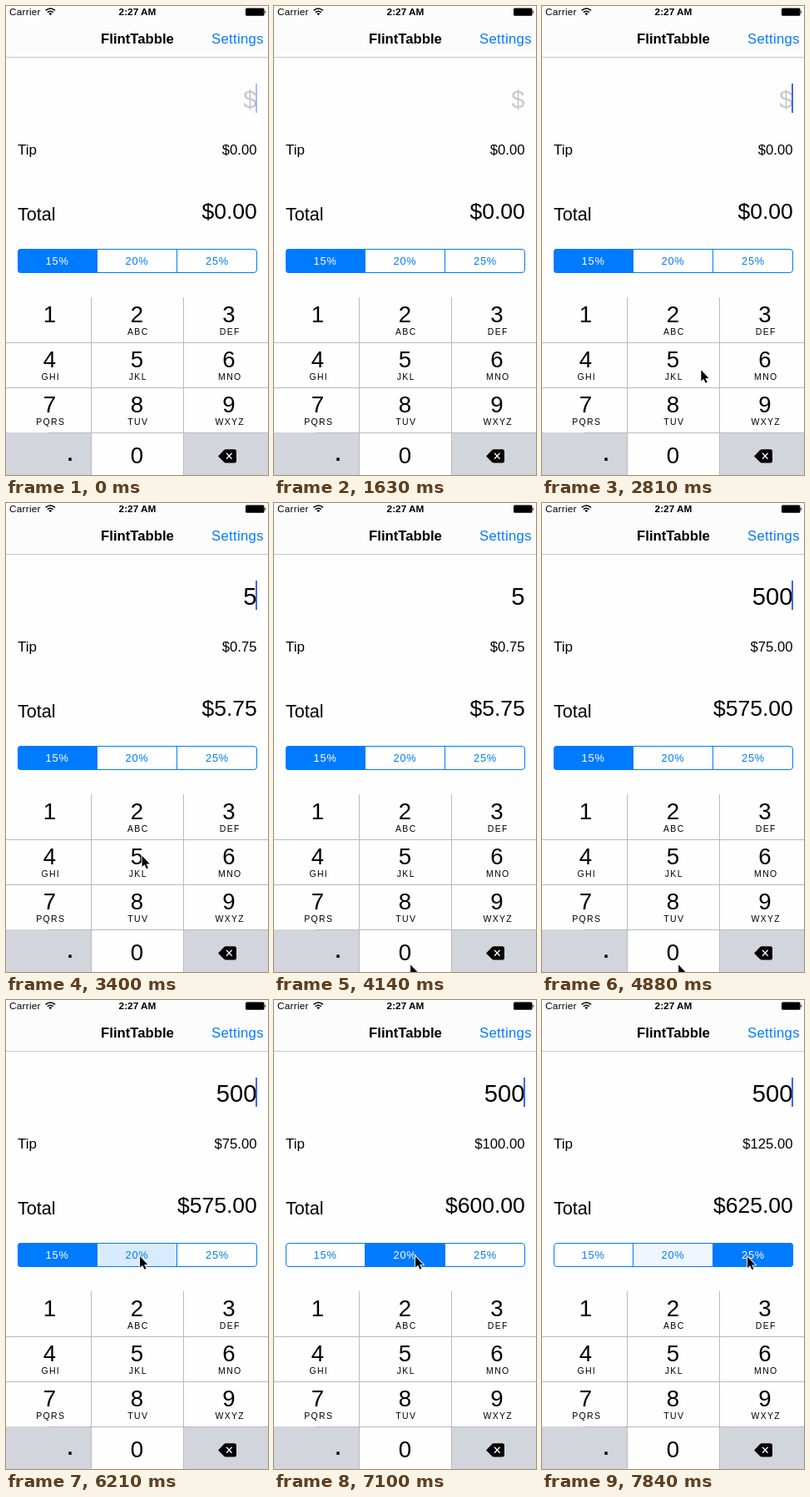
An HTML page that plays this animation: 315x562 px, repeating every 7.99 s.

```html
<!DOCTYPE html>
<html lang="en">
<head>
<meta charset="utf-8">
<title>Tip calculator</title>
<style>
  html, body { margin: 0; width: 100%; height: 100%; overflow: hidden; background: #fff; }
  svg { display: block; width: 100vw; height: 100vh; }
  text { font-family: "Liberation Sans", Arial, sans-serif; }
</style>
</head>
<body>
<svg id="stage" viewBox="0 0 315 562" xmlns="http://www.w3.org/2000/svg">
  <defs>
    <clipPath id="pill"><rect x="14" y="291" width="288" height="29" rx="4"/></clipPath>
  </defs>
  <rect width="315" height="562" fill="#fefefe"/>
  <rect width="315" height="61" fill="#fcfcfc"/>
  <rect y="61" width="315" height="1" fill="#c9c9cb"/>

  <!-- status bar -->
  <text x="4" y="11" font-size="11.8" letter-spacing=".25">Carrier</text>
  <g fill="none" stroke="#000" stroke-width="1.6">
    <path d="M47.6 5.4Q53.3 .6 59 5.4"/>
    <path d="M49.8 7.7Q53.3 4.8 56.8 7.7"/>
  </g>
  <path d="M51.4 9.1Q53.3 7.6 55.2 9.1L53.3 11.2Z"/>
  <text x="158" y="11" font-size="11.8" font-weight="bold" text-anchor="middle">2:27 AM</text>
  <rect x="288" y="2.5" width="22.5" height="9.2" rx="1.5"/>
  <path d="M311.2 5.4q2 1.7 0 3.6z"/>

  <!-- title bar -->
  <text x="158" y="45" font-size="16.7" font-weight="bold" text-anchor="middle">FlintTabble</text>
  <text x="309.8" y="45" font-size="16.7" letter-spacing=".3" text-anchor="end" fill="#007aff">Settings</text>

  <!-- bill -->
  <text id="entry" x="301.5" y="122" font-size="29.2" text-anchor="end"></text>
  <rect id="caret" x="300" y="93" width="2" height="35" fill="#3f68e6"/>
  <text x="14" y="178" font-size="17">Tip</text>
  <text id="tip" x="301.5" y="178" font-size="16.7" text-anchor="end"></text>
  <text x="14" y="257" font-size="21.6">Total</text>
  <text id="total" x="301.8" y="255" font-size="26.5" text-anchor="end"></text>

  <g id="tints" clip-path="url(#pill)"></g>
  <g fill="none" stroke="#007aff">
    <rect x="14.5" y="291.5" width="287" height="28" rx="3.5"/>
    <path d="M109.5 292V319M205.5 292V319"/>
  </g>
  <g clip-path="url(#pill)"><rect id="chosen" y="291" width="96" height="29" fill="#007aff"/></g>
  <g id="rates" font-size="12.8" letter-spacing=".8" text-anchor="middle"></g>

  <!-- keypad -->
  <path d="M0 511H102V562H0ZM214 511H315V562H214Z" fill="#d2d5db"/>
  <rect id="press" x="103" width="110" fill="#d2d5db"/>
  <path d="M102.5 349V562M213.5 349V562M0 403.5H315M0 457.5H315M50 511.5H315" stroke="#b9babd" fill="none"/>
  <g id="keys" text-anchor="middle"></g>
  <rect x="75.3" y="541.3" width="3.4" height="3.7"/>
  <path d="M255 539.5L262 532.2Q263 531.3 264.5 531.3H274.5Q277 531.3 277 533.8V545Q277 547.5 274.5 547.5H264.5Q263 547.5 262 546.6Z"/>
  <path d="M265 535.8L271.6 542.8M271.6 535.8L265 542.8" stroke="#fff" stroke-width="1.3"/>

  <path id="pointer" d="M.6 .8V14L3.6 11.2L6 16.2L8 15.3L5.7 10.4H9.8Z" stroke="#fff" stroke-width="1.8" paint-order="stroke"/>
</svg>
<script>
const LOOP = 7990, STEP = 148, LAST = 53;
const $ = id => document.getElementById(id);

function add(parent, tag, attrs, text = '') {
  const el = document.createElementNS('http://www.w3.org/2000/svg', tag);
  for (const name in attrs) el.setAttribute(name, attrs[name]);
  el.textContent = text;
  return $(parent).appendChild(el);
}

const segX = [14, 109.5, 205.5];
const percents = [15, 20, 25];
const tints = segX.map(x => add('tints', 'rect', { x, y: 291, width: 97, height: 29 }));
const labels = percents.map((p, i) =>
  add('rates', 'text', { x: [61.6, 157.5, 254][i], y: 310 }, p + '%'));

const letters = ['', 'ABC', 'DEF', 'GHI', 'JKL', 'MNO', 'PQRS', 'TUV', 'WXYZ'];
const colX = [52.5, 157.5, 268];
letters.forEach((word, i) => {
  const x = colX[i % 3], y = 378.6 + 54 * Math.floor(i / 3);
  add('keys', 'text', { x, y, 'font-size': 27.6 }, i + 1);
  add('keys', 'text', { x: x + 1.3, y: y + 15.4, 'font-size': 10.5, 'letter-spacing': 1.3 }, word);
});
add('keys', 'text', { x: 157.5, y: 547.8, 'font-size': 27.6 }, '0');

// [tick, value] lists; the latest entry reached holds
const caret = [[0, .45], [1, 1], [4, .45], [5, 0], [7, 1], [10, .45], [11, 0], [14, 1],
  [16, .45], [17, 0], [19, 1], [27, .45], [28, 0], [29, 1], [37, .45], [38, 0], [40, 1],
  [43, .45], [44, 0], [46, 1], [49, .45], [50, 0], [52, 1]];
const typed = [[0, ''], [22, '5'], [29, '50'], [32, '500']];
const pressed = [[0, ''], [22, '5'], [23, ''], [29, '0'], [30, ''], [31, '0'], [33, '']];
const choice = [[0, 0], [43, 1], [53, 2]];
const held = (list, n) => list.filter(([at]) => at <= n).pop()[1];

// pointer moves: start tick, end tick, from, to
const moves = [
  [15, 21, [270, 474], [163, 422]],
  [23, 28, [163, 422], [163.5, 552.5]],
  [34, 41, [163.5, 552.5], [160.5, 306.5]],
  [47, 52, [160.5, 306.5], [246.5, 307]]
];
const ease = u => u * u * (3 - 2 * u);

function pointerAt(n) {
  const [a, b, from, to] = moves.filter(m => m[0] <= n).pop();
  const u = ease(Math.min(1, (n - a) / (b - a)));
  return from.map((v, i) => v + (to[i] - v) * u);
}

const money = v => '$' + v.toFixed(2);
const TOUCH = '#d9ebff', FADE = '#f0f6ff';

function draw(ms) {
  const n = Math.min(LAST, Math.floor((ms + 16) / STEP));
  const bill = held(typed, n), pick = held(choice, n), key = held(pressed, n);
  const tip = bill * percents[pick] / 100;

  $('entry').textContent = bill || '$';
  $('entry').setAttribute('fill', bill ? '#000' : '#c7c7cd');
  $('tip').textContent = money(tip);
  $('total').textContent = money(+bill + tip);
  $('caret').setAttribute('opacity', held(caret, n));

  const glow = { 42: [1, TOUCH], 43: [0, FADE], 52: [2, TOUCH], 53: [1, FADE] }[n] || [];
  tints.forEach((el, i) => el.setAttribute('fill', glow[0] === i ? glow[1] : '#fefefe'));
  labels.forEach((el, i) => el.setAttribute('fill', i === pick ? '#fff' : '#007aff'));
  $('chosen').setAttribute('x', [14, 109, 205][pick]);
  $('chosen').setAttribute('width', pick ? 97 : 96);

  $('press').setAttribute('y', key === '5' ? 404 : 512);
  $('press').setAttribute('height', key === '5' ? 53 : 50);
  $('press').setAttribute('visibility', key ? 'visible' : 'hidden');

  const shown = n >= moves[0][0];
  $('pointer').setAttribute('visibility', shown ? 'visible' : 'hidden');
  if (shown) $('pointer').setAttribute('transform', `translate(${pointerAt(n)})`);
}

function loop() {
  draw(performance.now() % LOOP);
  requestAnimationFrame(loop);
}
loop();
</script>
</body>
</html>
```
